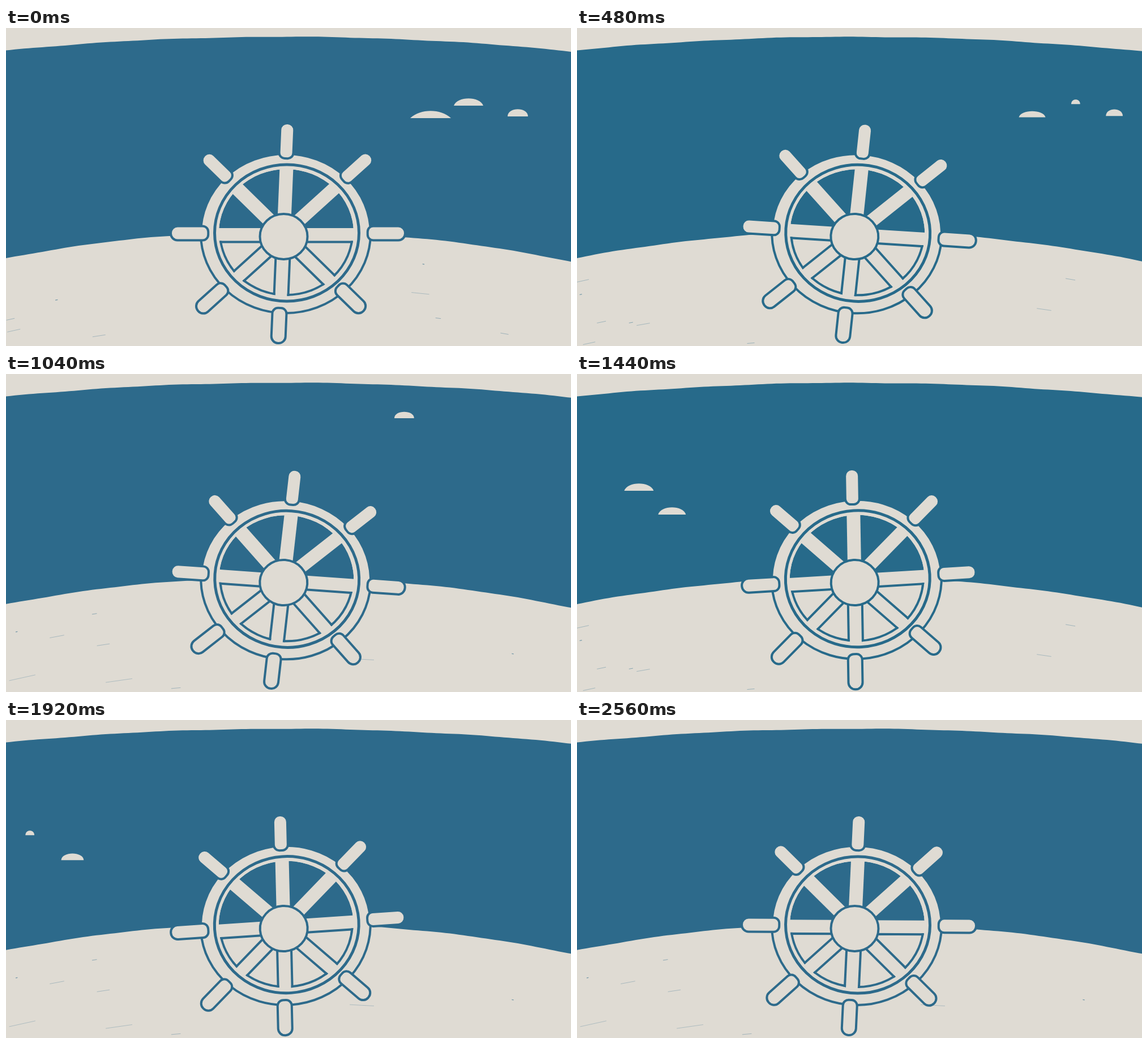
Animation of 998x561 px, one loop 2.64 s. Source, as an HTML page with a canvas:

```html
<!DOCTYPE html>
<html lang="en">
<head>
<meta charset="utf-8">
<title>Ship's wheel</title>
<style>
html, body { margin: 0; width: 100%; height: 100%; overflow: hidden; background: #dfdbd3; }
canvas { display: block; }
</style>
</head>
<body>
<canvas id="stage" width="998" height="561"></canvas>
<script>
const ctx = document.getElementById('stage').getContext('2d');
const W = 998, H = 561, LOOP = 2640, STEP = 80, CREAM = '#dfdbd3';
const HUB = { x: 490.5, y: 365 };

// Three sheets of paper take turns; the seed places their scratches
const papers = [
  { sea: '#2d6a8b', seed: 11 },
  { sea: '#2d6a8b', seed: 42 },
  { sea: '#276a8a', seed: 77 }
];

// Each swing eases the wheel to an angle in degrees, then holds it
const swings = [
  { from: 0, to: 620, angle: 4.2 },
  { from: 1000, to: 1540, angle: -4.2 },
  { from: 1860, to: 2320, angle: 3.6 },
  { from: 2400, to: 2720, angle: -3 }
];

// Position is x + v * t, y is the flat base
const waves = [
  { x: 750, y: 159, v: .1125, w: 72, born: -400, die: 780 },
  { x: 817, y: 137, v: .133, w: 52, born: -400, die: 580 },
  { x: 904, y: 156, v: .094, w: 36, born: -400, die: 900 },
  { x: 589, y: 79, v: .11, w: 47, born: 640, die: 1400 },
  { x: 311, y: 206, v: -.14, w: 52, born: 1120, die: 2020 },
  { x: 319, y: 248, v: -.105, w: 49, born: 1120, die: 2330 }
];

const clamp = u => Math.min(1, Math.max(0, u));
const smooth = u => u * u * (3 - 2 * u);
const skyline = x => 15.5 + 24.5 * ((x - 490) / 495) ** 2;
const deckLine = x => 359 + 47 * ((x - 484) / 484) ** 2;

function randomFrom(seed) {
  return () => (seed = (seed * 16807) % 2147483647) / 2147483647;
}

function turnAt(t) {
  return swings.reduce((angle, s) =>
    angle + (s.angle - angle) * smooth(clamp((t - s.from) / (s.to - s.from))), 0);
}

function drawPaper({ sea, seed }) {
  const wobble = x => .6 * Math.sin(x / 29 + seed) * Math.sin(x / 71);
  ctx.fillStyle = CREAM;
  ctx.fillRect(0, 0, W, H);
  ctx.fillStyle = ctx.strokeStyle = sea;
  ctx.beginPath();
  for (let x = 0; x <= W + 8; x += 8) ctx.lineTo(x, skyline(x) + wobble(x));
  for (let x = W + 2; x >= -8; x -= 8) ctx.lineTo(x, deckLine(x) + wobble(x + 40));
  ctx.fill();
  drawScratches(randomFrom(seed * 9973));
}

// Faint strokes that follow the bend of the deck, mostly on its left
function drawScratches(random) {
  ctx.globalAlpha = .6;
  for (let i = 0; i < 10; i++) {
    const x = W * random() ** 2, length = 3 + 45 * random() ** 2;
    const y = deckLine(x) + 15 + random() * (H - deckLine(x) - 15);
    ctx.lineWidth = .4 + 3 / length;
    ctx.beginPath();
    ctx.moveTo(x, y);
    ctx.lineTo(x + length, y + length * (x - 490) / 2200);
    ctx.stroke();
  }
  ctx.globalAlpha = 1;
}

function drawWave({ x, y, v, w, born, die }, t) {
  if (t <= born || t >= die) return;
  const size = Math.min(1, (t - born) / 240, ((die - t) / 550) ** .7);
  const half = w * size / 2, dome = 17 * size ** .4;
  const cx = x + v * t, base = y - 4 * (1 - size);
  const lean = half * clamp(1.5 - half / 36);
  ctx.fillStyle = CREAM;
  ctx.beginPath();
  ctx.moveTo(cx - half, base);
  ctx.bezierCurveTo(cx - lean, base - dome, cx + lean, base - dome, cx + half, base);
  ctx.fill();
}

function oval(x, y, rx, ry) {
  ctx.beginPath();
  ctx.ellipse(x, y, rx, ry, 0, 0, Math.PI * 2);
}

// Direction of one of the eight spokes; the upright pair leans to the right
function spoke(i) {
  const a = i * Math.PI / 4;
  return { x: Math.cos(a) - .04 * Math.sin(a), y: Math.sin(a) };
}

// Gap between two spokes: open sea above, outlined deck below
function drawGap(i, sea) {
  const onDeck = i < 4, halfSpoke = onDeck ? 10.5 : 12, squash = .94;
  const a = spoke(i), b = spoke(i + 1), inset = halfSpoke * Math.SQRT2;
  const x = HUB.x + (a.x + b.x) * inset, y = HUB.y + (a.y + b.y) * inset;
  const sector = new Path2D(), rim = new Path2D();
  sector.moveTo(x, y);
  sector.lineTo(x + a.x * 250, y + a.y * 250 * squash);
  sector.lineTo(x + b.x * 250, y + b.y * 250 * squash);
  sector.closePath();
  rim.ellipse(495, 361, 119, 112, 0, 0, Math.PI * 2);
  ctx.save();
  ctx.clip(sector);
  ctx.clip(rim);
  ctx.fillStyle = onDeck ? CREAM : sea;
  ctx.fill(rim);
  if (onDeck) {
    ctx.lineWidth = 8;
    ctx.stroke(sector);
    ctx.stroke(rim);
  }
  ctx.restore();
}

function drawHandle(i) {
  const dir = spoke(i);
  const cx = 489 + 9 * dir.x ** 4, dx = 207 * dir.x, dy = 194 * dir.y;
  const length = Math.hypot(dx, dy);
  ctx.save();
  ctx.translate(cx, 362);
  ctx.rotate(Math.atan2(dy, dx));
  ctx.beginPath();
  ctx.roundRect(length * .68, -12.5, length * .32, 25, [10, 12, 12, 10]);
  ctx.fill();
  ctx.stroke();
  ctx.restore();
}

function drawWheel(degrees, sea) {
  ctx.save();
  ctx.translate(HUB.x, HUB.y);
  ctx.rotate(degrees * Math.PI / 180);
  ctx.translate(-HUB.x, -HUB.y);
  ctx.strokeStyle = sea;
  ctx.fillStyle = CREAM;
  ctx.lineWidth = 4;
  oval(494, 362.5, 150, 140.5);
  ctx.fill();
  ctx.stroke();
  ctx.lineWidth = 5;
  oval(496, 361.5, 127.5, 120.5);
  ctx.stroke();
  for (let i = 0; i < 8; i++) drawGap(i, sea);
  ctx.lineWidth = 4;
  oval(490.5, 368, 42, 40);
  ctx.fill();
  ctx.stroke();
  for (let i = 0; i < 8; i++) drawHandle(i);
  ctx.restore();
}

function drawFrame(time) {
  const step = Math.floor((time % LOOP) / STEP), t = step * STEP;
  const beat = (step + 1) % 10;
  const paper = papers[beat < 3 ? 0 : beat < 7 ? 1 : 2];
  drawPaper(paper);
  waves.forEach(wave => drawWave(wave, t));
  drawWheel(turnAt(t), paper.sea);
}

const start = performance.now();
function tick() {
  drawFrame(performance.now() - start);
  requestAnimationFrame(tick);
}
tick();
</script>
</body>
</html>
```
